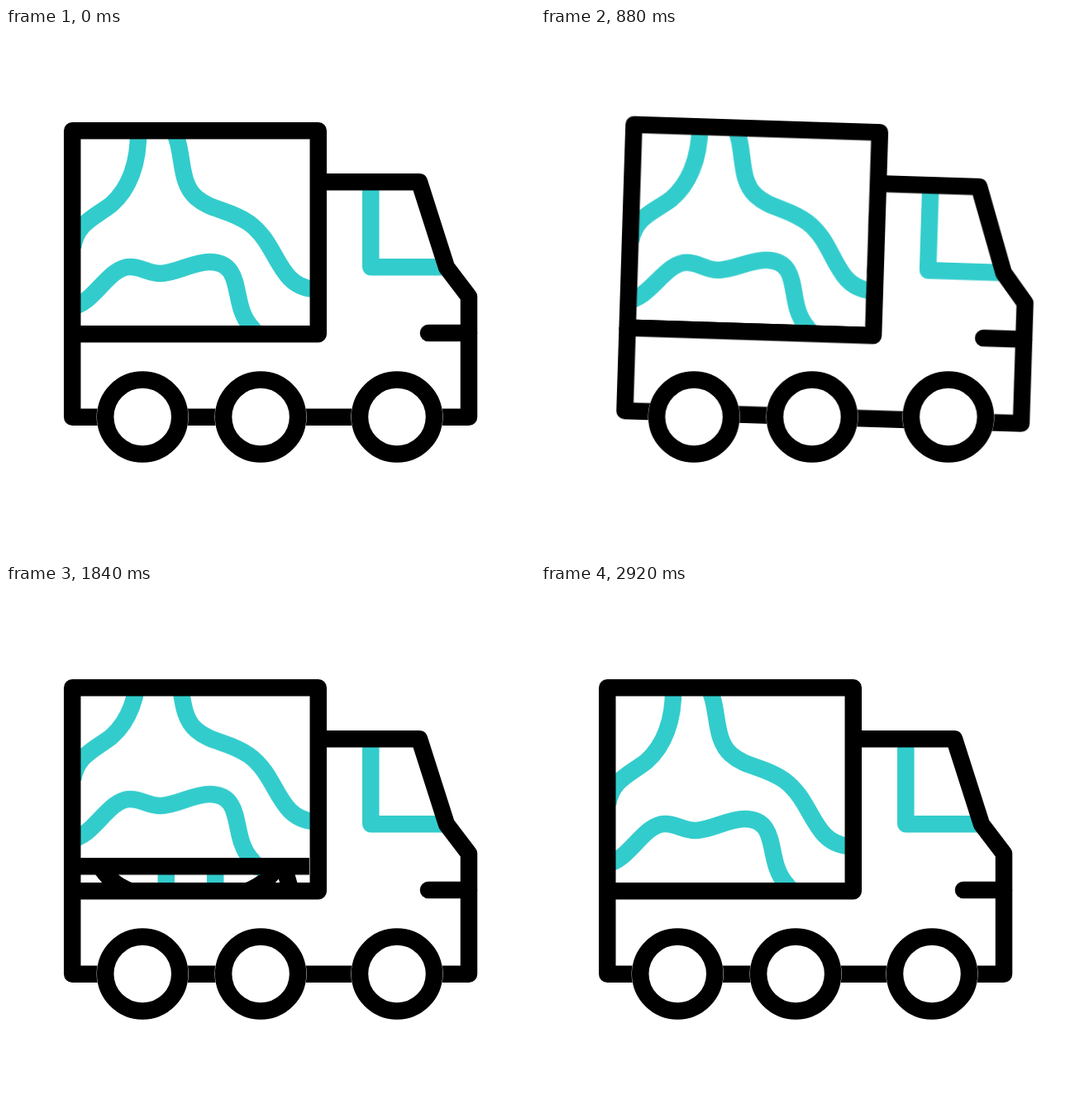
Animation of 640x640 px, one loop 3000 ms. Source, as an HTML page without scripts:

```html
<!DOCTYPE html>
<html lang="en">
<head>
<meta charset="utf-8">
<title>Tank truck</title>
<style>
  html, body { margin: 0; width: 100%; height: 100%; overflow: hidden; background: #fff; }
  svg { display: block; width: 100%; height: 100%; }

  .line { fill: none; stroke: #000; stroke-width: 20.5; stroke-linejoin: round; }
  .teal { stroke: #33cccc; }
  .cap { stroke-linecap: round; }
  .fill { fill: #fff; }

  .truck, .body, .panel {
    animation: 3s cubic-bezier(.333, 0, .667, 1) infinite;
  }
  .truck { animation-name: drive; }
  .body { animation-name: tilt; transform-origin: 320px 512px; }
  .panel { animation-name: lift; }

  @keyframes drive {
    0%, 4% { transform: translateX(0); }
    22.667% { transform: translateX(43.5px); }
    42.667% { transform: translateX(-47.2px); }
    60%, 100% { transform: translateX(0); }
  }
  @keyframes tilt {
    0%, 4% { transform: rotate(0deg); }
    22.667% { transform: rotate(2deg); }
    59.333%, 100% { transform: rotate(0deg); }
  }
  @keyframes lift {
    0%, 57.333% { transform: translateY(0); }
    73.333%, 89.333% { transform: translateY(-188.5px); }
    97.333%, 100% { transform: translateY(0); }
  }
</style>
</head>
<body>
<svg viewBox="0 0 640 640">
  <defs>
    <clipPath id="bay"><rect x="90" y="134" width="278" height="226.5"/></clipPath>
    <g id="wheel">
      <circle class="fill" r="55.6"/>
      <circle class="line" r="45"/>
    </g>
  </defs>

  <g class="truck">
    <g class="body">
      <path class="line teal" d="M441.3 186V289.3H532"/>
      <path class="line" d="M80.2 370V470.7H560V325L533 289.5L500 186.2H378"/>
      <path class="line cap" d="M511 369H560"/>

      <g clip-path="url(#bay)">
        <!-- tank and its fittings -->
        <path class="line" d="M378 232.5H347.8L333 285V329L347.8 381.5M333 285H378M333 330H378"/>
        <rect class="line fill" x="105.3" y="241" width="231.5" height="132.5" rx="66.2"/>
        <path class="line teal" d="M193.8 251V363M253.2 251V363"/>

        <!-- sliding cover -->
        <g class="panel">
          <rect class="fill" x="80" y="124" width="298" height="246"/>
          <g class="line teal">
            <path d="M160 124C161 165 148 195 128 213C108 229 86 235 81 265"/>
            <path d="M200 120C217 145 207 185 230 205C248 221 270 219 294 236C330 262 328 312 372 316"/>
            <path class="cap" d="M80 337C106 334 124 289 150 289C164 289 172 297 187 297C205 297 226 283 246 283C290 283 271 333 296 361L304 371"/>
          </g>
          <path class="line" d="M80 370.3H366.9"/>
        </g>
      </g>

      <rect class="line" x="80.2" y="124.3" width="297.6" height="245.9"/>
    </g>

    <use href="#wheel" x="165.2" y="470.5"/>
    <use href="#wheel" x="308.1" y="470.5"/>
    <use href="#wheel" x="473" y="470.5"/>
  </g>
</svg>
</body>
</html>
```
